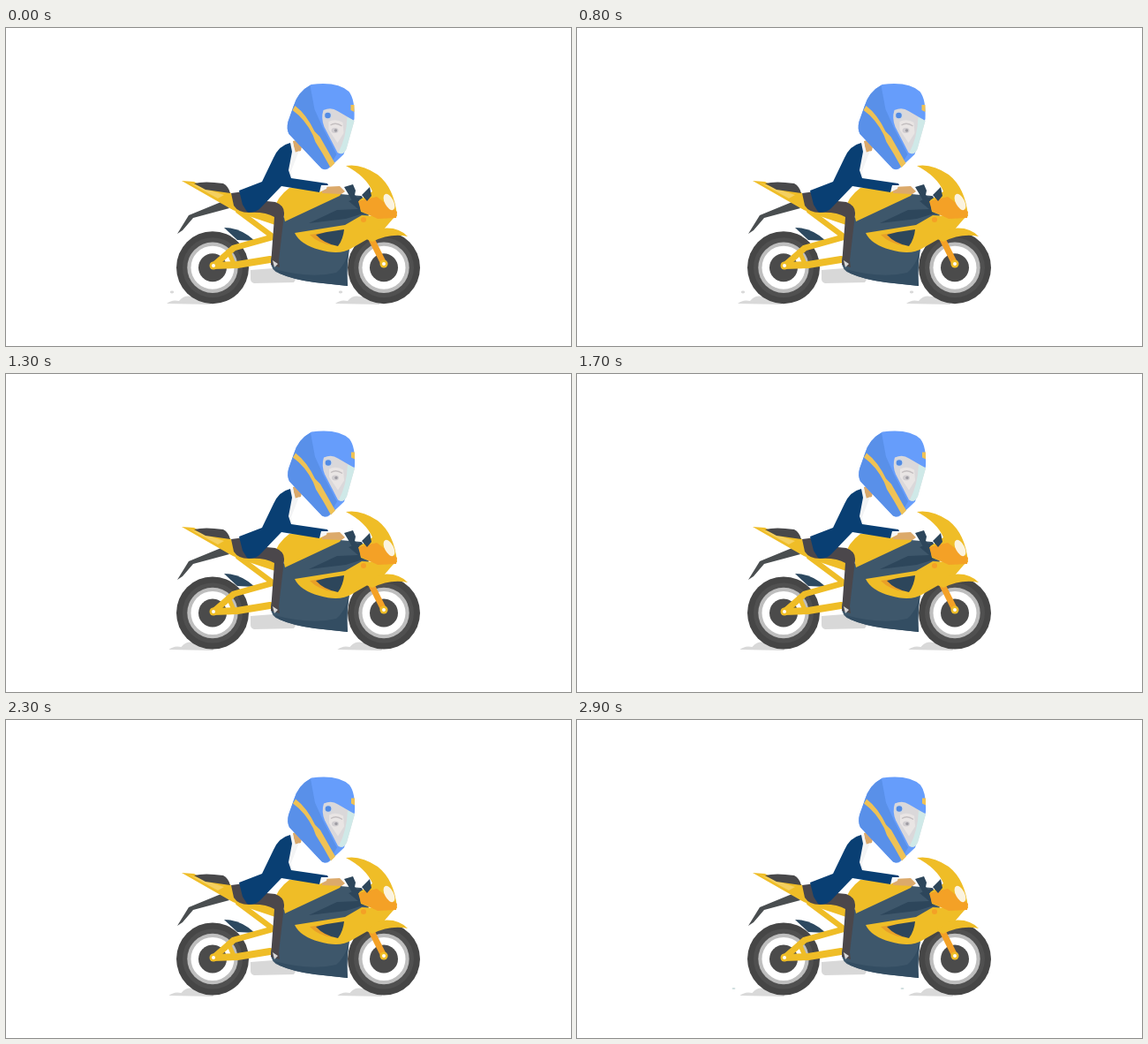
Animation of 640x360 px, one loop 3000 ms. Source, as an HTML page:

```html
<!DOCTYPE html>
<html lang="en">
<head>
<meta charset="utf-8">
<title>Rider</title>
<style>
  html, body { margin: 0; width: 100%; height: 100%; overflow: hidden; background: #fff; }
  svg { display: block; width: 100vw; height: 100vh; }
</style>
</head>
<body>
<svg viewBox="0 0 640 360">
  <defs>
    <g id="tyre">
      <circle r="41" fill="#464646"/>
      <circle r="34" fill="#505050"/>
      <circle r="28.7" fill="#bebebe"/>
      <circle r="24.5" fill="#fff"/>
      <circle r="16" fill="#4b4b4b"/>
    </g>
    <path id="shade" fill="#d9d9d9" d="M0 312Q6 307 14 309Q20 302 28 304L52 306L50 313Z"/>
    <ellipse id="near" cx="6" cy="299" rx="2.2" ry="1.4" fill="#d9d9d9"/>
    <ellipse id="far" cx="-7" cy="304" rx="2" ry="1" fill="#cfdede"/>
    <g id="dust"><use href="#shade"/><use href="#near"/><use href="#far"/></g>
  </defs>

  <g id="ground">
    <use href="#dust" x="182"/>
    <use href="#dust" x="373"/>
  </g>
  <path fill="#d8d8d8" d="M277 274L303 272L331 280L326 288L281 289Q277 288 277 284Z"/>

  <g id="wheels">
    <use href="#tyre" x="234" y="270.5"/>
    <use href="#tyre" x="428" y="270.5"/>
  </g>

  <!-- tail and swing arm -->
  <path fill="#4a4e50" d="M246 196L207 212L194 233L200 229L212 215L253 204Z"/>
  <path fill="#2d4960" d="M247 226Q266 226 282 241L262 240Z"/>
  <g fill="none" stroke="#efbd27" stroke-linejoin="round" stroke-linecap="round">
    <path stroke-width="7" d="M235 269L258 249L301 237"/>
    <path stroke-width="8" d="M235 269L262 268L299 262"/>
    <path stroke-width="5" d="M252 253L258 267"/>
    <path stroke-width="6" d="M263 207L302 236"/>
  </g>
  <path fill="#efbd27" d="M199 173L213 174L226 181L254 186L264 201L306 206L305 223L272 212L257 206Z"/>
  <path fill="#f5d060" d="M207 175L226 182L247 189L240 193Z"/>
  <path fill="#48484a" d="M213 176Q225 173 246 176Q252 179 254 187L226 183Z"/>

  <!-- fairing -->
  <path fill="#3e576b" d="M313 215L352 200L378 188L402 190L411 212L391 243Q385 262 387 292L350 288Q326 285 310 278Q300 275 300 264L305 235Z"/>
  <path fill="#2d465b" d="M343 221L375 206L399 205L388 196L403 190L411 208L385 216Z"/>
  <path fill="#334d62" d="M304 273Q345 284 374 277Q385 268 389 250Q385 268 387 292L350 288Q326 285 310 278Z"/>
  <path fill="#efbd27" d="M303 207Q307 191 321 181L372 182L380 187L378 190L316 219L314 210Z"/>

  <!-- rider's leg -->
  <path fill="#4b474b" d="M255 187L270 185L285 195L305 197Q316 201 315 211L309 263L310 271L300 268L304 214Q294 208 275 209Q263 209 258 201Z"/>
  <path fill="#d7d7d7" d="M302 263L308 267L304 271Z"/>

  <path fill="#efbd27" d="M327 232L384 223L403 212L440 214L427 229L392 249Q378 258 355 251Q333 245 327 232Z"/>
  <path fill="#e89f28" d="M344 234L364 231L370 246Q354 244 344 234Z"/>
  <path fill="#2d465b" d="M351 234Q366 230 383 228Q382 239 376 247Q360 244 351 234Z"/>
  <circle cx="405" cy="217" r="3" fill="#f4a126"/>

  <!-- front end -->
  <path fill="none" stroke="#f4a126" stroke-width="7" stroke-linecap="round" d="M414 239L428 267"/>
  <path fill="#efbd27" d="M406 238L424 227Q444 224 455 236Q435 232 415 242Z"/>
  <path fill="#efbd27" d="M385 156Q402 153 421 166Q440 181 443 213L425 217L402 208L400 195L415 185Q408 168 385 156Z"/>
  <path fill="#f4a126" d="M402 207L399 196L420 191L443 208L442 215L421 216Z"/>
  <ellipse cx="434" cy="197" rx="5" ry="10" transform="rotate(-28 434 197)" fill="#fbf3df"/>
  <path fill="#2d465b" d="M403 189L412 180L414 190L409 196ZM383 180L393 177L396 184L395 189L400 194L394 199L389 190Z"/>
  <g fill="#efbd27"><circle cx="235" cy="269" r="4.5"/><circle cx="428" cy="267" r="4.5"/></g>
  <g fill="#fff"><circle cx="235" cy="269" r="2"/><circle cx="428" cy="267" r="2"/></g>

  <!-- rider -->
  <path fill="#d9a86a" d="M325 128L337 125L334 139L327 141Z"/>
  <path fill="#f3f4f5" d="M321 131L325 130L328 141L332 139L323 162L324 170L317 163Z"/>
  <path fill="#dcaa6b" d="M358 180L378 179L384 185L380 188L358 187Z"/>
  <path fill="#f6f6f6" d="M356 178L364 178L363 182L355 186Z"/>
  <path fill="#093f73" d="M322 130Q309 133 303 147L290 174L264 184L268 200L273 208Q282 210 288 204L312 179L355 186L357 178L365 178L364 176L323 170L320 161L324 140Z"/>

  <g id="head">
    <path fill="#669dfb" d="M346 64Q376 60 389 72Q396 81 395 103L383 143L367 158Q363 162 358 159L321 120Q318 114 320 106L326 89Q331 72 346 64Z"/>
    <path fill="#5990e9" d="M345 65L350 92L359 112L375 143L366 158Q362 161 358 159L321 120Q318 114 320 106L326 89Q331 72 345 65Z"/>
    <path fill="#efc255" d="M328 88Q341 98 350 117L356 123L373 153L368 158Q360 143 351 129L348 121Q339 103 325 93Z"/>
    <path fill="#dad8da" d="M360 93Q369 89 376 94L395 105L386 137Q382 145 376 141L361 112Q357 102 360 93Z"/>
    <path fill="#e9e5e4" d="M366 106Q374 102 382 107L383 119L376 130L366 115Z"/>
    <path fill="#cfe9e8" d="M387 101L395 105L386 137Q382 145 377 141Q386 124 387 101Z"/>
    <path fill="none" stroke="#c4bfc0" stroke-width="1.5" d="M368 110Q374 106 381 111"/>
    <ellipse cx="373" cy="116" rx="4" ry="3" fill="#d0cdd0"/>
    <circle cx="374" cy="116" r="1.7" fill="#9f9da3"/>
    <circle cx="365" cy="99" r="4.8" fill="#cfd6e2"/>
    <circle cx="365" cy="99" r="3.3" fill="#518be4"/>
    <path fill="#efc255" d="M391 87L395 87L395 95L391 93Z"/>
  </g>
</svg>
<script>
  const LOOP = 3000, STEP = 100;
  const $ = id => document.getElementById(id);
  const move = (id, x, y) => $(id).setAttribute("transform", `translate(${x} ${y})`);
  const show = (id, on) => $(id).setAttribute("opacity", on ? 1 : 0);

  // Engine shake flips every step; dust repeats every five.
  function draw(ms) {
    const n = Math.floor((ms % LOOP) / STEP);
    const odd = n % 2, puff = n % 5;
    move("head", odd ? 0 : -0.5, odd ? 1.5 : 0);
    move("wheels", 0, odd ? 0 : 0.7);
    move("ground", odd ? 2.5 : 0, 0);
    show("far", puff === 4);
    show("near", !odd && (puff === 0 || puff === 3));
  }

  const start = performance.now();
  function tick() {
    draw(performance.now() - start);
    requestAnimationFrame(tick);
  }
  tick();
</script>
</body>
</html>
```
